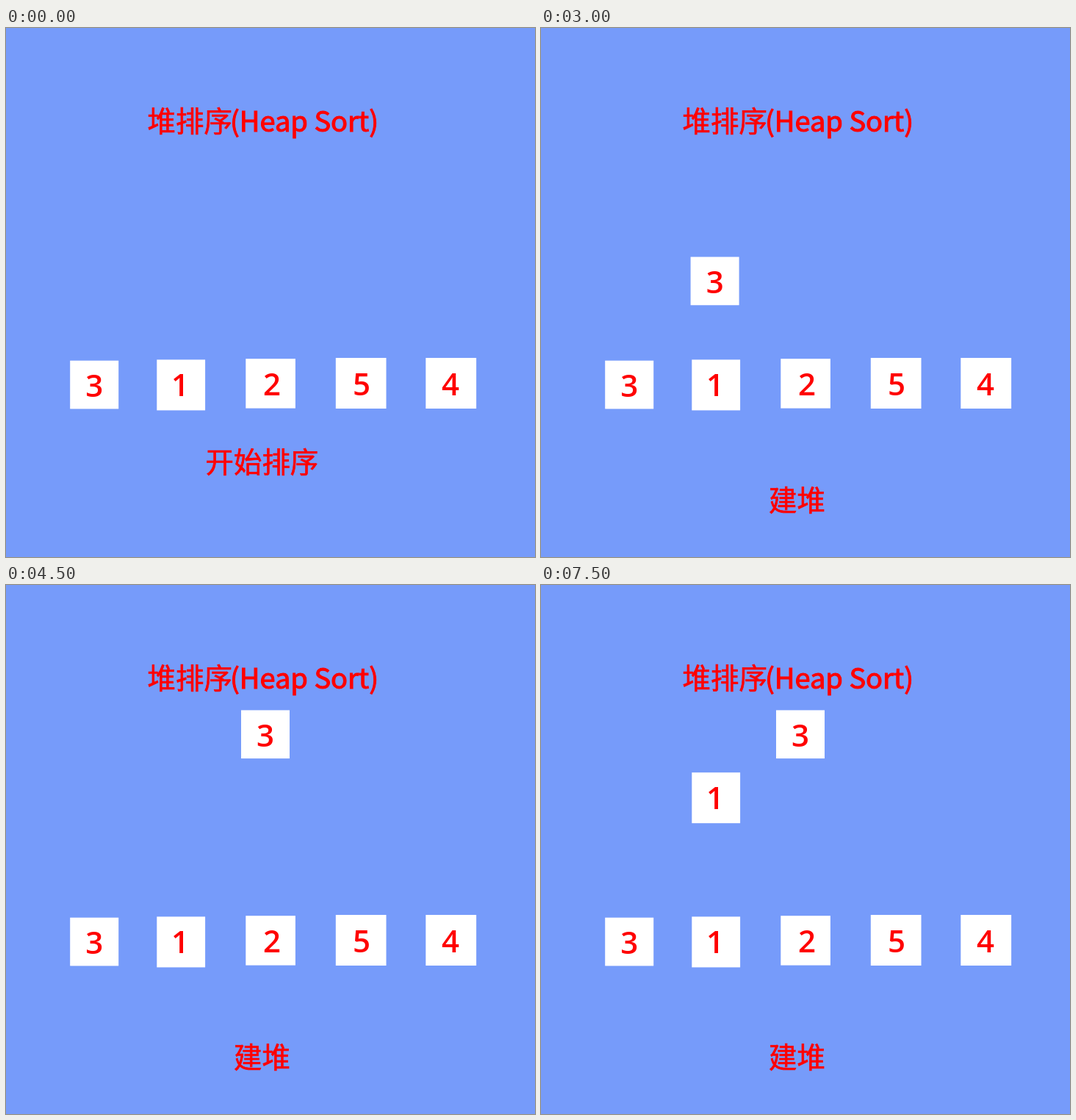
Recreate the animation shown at these times as an HTML page. Size 720 by 720 pixels, loop 8 s.

```html
<!DOCTYPE html>
<html lang="zh">
<head>
<meta charset="utf-8">
<title>Heap Sort</title>
<style>
  html, body { margin: 0; width: 100%; height: 100%; overflow: hidden; background: #769bfa; }
  svg { display: block; width: 100vw; height: 100vh; }
  text { fill: #f00; }
  .label { font: 400 38.4px "Noto Sans CJK SC", "Noto Sans CJK", sans-serif; stroke: #f00; stroke-width: .7px; }
  .latin { font-size: 38px; stroke-width: 1.1px; }
  .digit { font: 550 42px "Open Sans", "Noto Sans", sans-serif; font-stretch: 88%; text-anchor: middle; }
</style>
</head>
<body>
<svg id="stage" viewBox="0 0 720 720">
  <text class="label" x="192.6" y="140.8">堆排序<tspan class="latin" x="305" y="141">(Heap Sort)</tspan></text>
  <text class="label" id="start" x="271.6" y="605.3">开始排序</text>
  <text class="label" id="build" x="310" y="657.3">建堆</text>
</svg>
<script>
const NS = 'http://www.w3.org/2000/svg';
const LOOP = 8000, STEP = 500, MOVES = 6;
const stage = document.getElementById('stage');
const startLabel = document.getElementById('start');
const buildLabel = document.getElementById('build');

function add(parent, tag, attrs) {
  const el = document.createElementNS(NS, tag);
  for (const key in attrs) el.setAttribute(key, attrs[key]);
  return parent.appendChild(el);
}

function addCard([digit, x, y, width, height, cx, baseline]) {
  const card = add(stage, 'g', {});
  add(card, 'rect', { x, y, width, height, fill: '#fff' });
  add(card, 'text', { x: cx, y: baseline, class: 'digit' }).textContent = digit;
  return card;
}

// digit, box x, y, width, height, digit centre, baseline
const cards = [
  [3, 87.2, 452.7, 66, 65.7, 120.3, 502],
  [1, 205.3, 451.4, 65.8, 69, 237, 501],
  [2, 326.3, 450.2, 67.6, 67.4, 362, 500],
  [5, 448.8, 449, 68.7, 69, 484, 500],
  [4, 571.3, 449, 68.8, 69, 605, 500]
];
cards.forEach(addCard);

// Copies that climb to their place in the heap; "from" is the step before the first move.
const climbers = [
  { card: addCard(cards[0]), from: 3, dx: 38.8, dy: -47.05 },
  { card: addCard(cards[1]), from: 9, dx: 0, dy: -32.7 }
];

const show = (el, on) => el.setAttribute('visibility', on ? 'visible' : 'hidden');

function draw(now) {
  const step = Math.floor((now % LOOP) / STEP);
  show(startLabel, step < 2);
  show(buildLabel, step >= 2);
  for (const { card, from, dx, dy } of climbers) {
    const n = Math.min(step - from, MOVES);
    show(card, n > 0);
    card.setAttribute('transform', `translate(${n * dx} ${n * dy})`);
  }
}

const began = performance.now();
function tick() {
  draw(performance.now() - began);
  requestAnimationFrame(tick);
}
tick();
</script>
</body>
</html>
```
